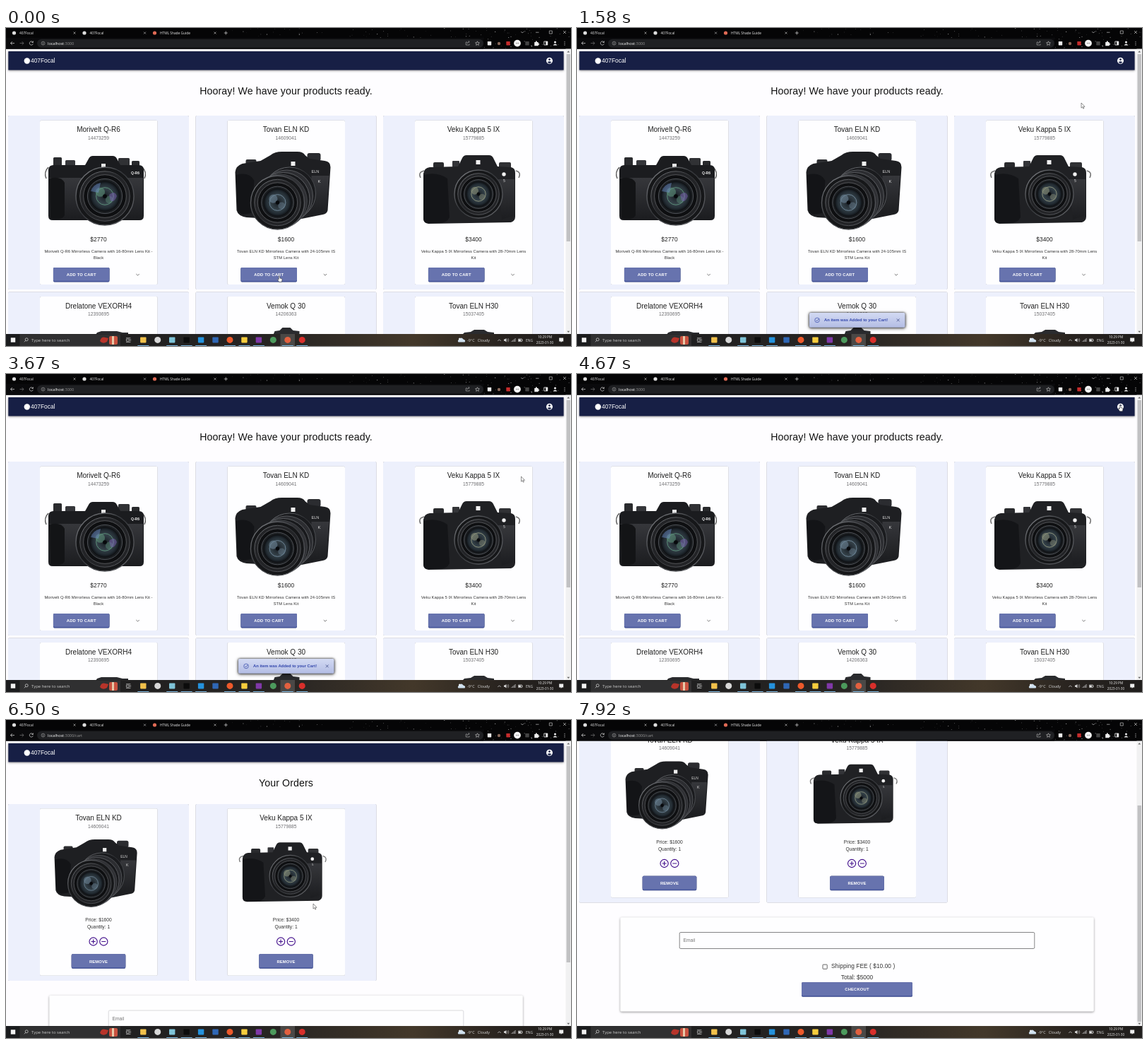
Recreate the animation shown at these times as an HTML page. Size 800 px wide and 450 px high, loop 8 s.

```html
<!DOCTYPE html>
<html lang="en">
<head>
<meta charset="utf-8">
<title>Camera shop</title>
<style>
html, body { margin: 0; width: 100%; height: 100%; overflow: hidden; background: #000; }
svg { display: block; width: 100vw; height: 100vh; }
text { font-family: "Liberation Sans", Arial, sans-serif; white-space: pre; }
.ui { font-family: "Open Sans", sans-serif; }
.low { filter: drop-shadow(0 .7px .5px rgba(0,0,0,.4)); }
.mid { filter: drop-shadow(0 1px 1.6px rgba(0,0,0,.42)); }
.high { filter: drop-shadow(0 1.5px 2.5px rgba(0,0,0,.55)); }
.dark { filter: drop-shadow(0 0 1.6px rgba(0,0,0,.75)) drop-shadow(0 1px 2.2px rgba(0,0,0,.6)); }
</style>
</head>
<body>
<svg id="stage" viewBox="0 0 800 450" preserveAspectRatio="none"></svg>
<script>
const COLS = [131, 396.5, 662];
const NAVY = '#171f45';

// Drawing helpers; text is placed by the middle of its capitals.
const attrs = o => Object.entries(o).map(([k, v]) => ` ${k}="${v}"`).join('');
const rect = (x, y, w, h, fill, o = {}) =>
  `<rect x="${x}" y="${y}" width="${w}" height="${h}" fill="${fill}"${attrs(o)}/>`;
const circle = (x, y, r, fill, o = {}) =>
  `<circle cx="${x}" cy="${y}" r="${r}" fill="${fill}"${attrs(o)}/>`;
const path = (d, fill, o = {}) => `<path d="${d}" fill="${fill}"${attrs(o)}/>`;
const line = (d, stroke, w = .7, o = {}) =>
  path(d, 'none', { stroke, 'stroke-width': w, ...o });
const text = (x, y, s, size, fill = '#212121', o = {}) =>
  `<text x="${x}" y="${y + size * .358}" font-size="${size}" fill="${fill}"${attrs(o)}>${s}</text>`;
const mid = (x, y, s, size, fill, o = {}) =>
  text(x, y, s, size, fill, { 'text-anchor': 'middle', ...o });
const ui = (x, y, s, size, fill = '#ddd', o = {}) => text(x, y, s, size, fill, { class: 'ui', ...o });
const group = (body, o = {}) => `<g${attrs(o)}>${body}</g>`;
const cross = (x, y, r, color, w = .6) =>
  line(`M${x - r} ${y - r}l${2 * r} ${2 * r}m0 ${-2 * r}l${-2 * r} ${2 * r}`, color, w);

function button(cx, y, w, label) {
  const x = cx - w / 2;
  return group(rect(x, y, w, 20.5, '#4a5a9f', { rx: 1.7 }) + rect(x, y, w, 18.7, '#6773ae', { rx: 1.7 }),
    { class: 'low' }) +
    mid(cx, y + 10.2, label, 5.83, '#fff', { 'font-weight': 700, 'letter-spacing': .165 });
}

// Cameras: x is measured from the column centre.
const ring = (x, y, r, fill, stroke, w = 1) => circle(x, y, r, fill, { stroke, 'stroke-width': w });
const lens = (x, y, r, tint) =>
  ring(x, y, r, '#161719', 'url(#rim)', 1.4) + ring(x, y, r * .86, '#232427', 'url(#rim)', 1) +
  ring(x, y, r * .74, '#0e0f11', '#77797d', .6) + ring(x, y, r * .6, '#1b1e21', '#55595e', .9) +
  circle(x, y, r * .53, 'url(#glass)') + ring(x, y, r * .3, 'none', tint, 1) +
  circle(x - r * .16, y - r * .14, r * .16, tint, { opacity: .6 }) +
  circle(x + r * .15, y + r * .12, r * .13, tint, { opacity: .45 }) + circle(x, y, r * .07, '#07090c');

const cameraA = () =>
  line('M-71 197q-7 7-3 16M62 197q7 7 3 16', '#555', 1.4) +
  rect(-64, 183, 12, 12, '#2a2b2e', { rx: 1.5 }) + rect(-47, 187, 14, 8, '#35363a', { rx: 1.5 }) +
  rect(28, 184, 16, 11, '#303134', { rx: 1.5 }) + rect(47, 188, 11, 8, '#28292c', { rx: 1.5 }) +
  path('M-71 200q1-6 7-6H-19l5-9q2-4 6-4H20q4 0 6 4l5 9H57q7 0 7 7V266q0 6-6 6H-65q-6 0-6-6z', '#1b1c1f') +
  path('M-70 212H63V265q0 5-5 5H-64q-6 0-6-6z', 'url(#body)') +
  path('M-70 213q17-4 22 6v46q-4 8-20 5z', '#131416') +
  rect(4, 192, 6, 6, '#e8e8e8') + text(46, 205, 'Q-R6', 5, '#eee', { 'font-weight': 700 }) +
  lens(9, 238, 41, '#5c8f79') +
  path('M-11 231q3-10 14-12l-3 14z', '#6c8cc4', { opacity: .5 }) +
  path('M15 236q8-7 11 2q-4 10-9 6z', '#7c63b5', { opacity: .5 });

const cameraB = () =>
  rect(-57, 186, 15, 8, '#2d2e31', { rx: 2 }) + rect(30, 177, 19, 11, '#2b2c30', { rx: 3 }) +
  path('M-72 204q1-9 10-12l26-4 14-8q6-5 16-5l22 0q8 0 11 5l6 5 22 3q8 1 8 9L59 258q-1 5-7 6l-40 8-68-4q-12-2-14-10z', '#1e1f22') +
  path('M-71 208q19-5 26 8l-4 46-12 2q-8-2-8-10z', '#131417') +
  path('M36 209H61L57 259l-22 5z', 'url(#body)') +
  rect(7, 189, 6, 6, '#f0f0f0') + text(36, 203, 'ELN', 5.6, '#ddd') + text(45, 217, 'K', 6, '#ddd') +
  ring(5, 234, 37, '#1a1b1e', 'url(#rim)') + ring(1, 238, 37, '#2c2d31', '#55575b') +
  ring(-4, 242, 37.5, '#18191c', '#6a6c70', .8) + ring(-8, 245, 38, '#303135', '#4a4c50', .8) +
  lens(-12, 247, 38, '#6d8496');

const cameraC = () =>
  line('M-70 202q-9 2-5 10M60 202q8 2 4 10', '#777', 1.5) +
  rect(-57, 190, 15, 8, '#292a2d', { rx: 2 }) + rect(-30, 188, 10, 9, '#333438', { rx: 1 }) +
  rect(36, 190, 17, 9, '#303134', { rx: 2 }) +
  path('M-71 206q1-8 9-9l40-1 6-12q2-4 6-4H22q4 0 6 4l6 12 19 1q6 1 6 8V267q0 6-6 8L-64 277q-6-1-7-7z', '#202124') +
  path('M-71 208q20-5 34 5l3 55q-4 8-14 8H-66q-5 0-5-7z', '#141518') +
  path('M35 214H58V265l-18 6z', 'url(#body)') +
  rect(3.5, 187, 6, 6, '#f2f2f2') + circle(43, 207, 2.7, '#f2f2f2') + text(42, 216.5, '5', 5, '#ddd') +
  lens(7, 235, 34, '#8b917a');

const PRODUCTS = [
  { name: 'Morivelt Q-R6', code: '14473259', price: 2770, art: cameraA(),
    info: ['Morivelt Q-R6 Mirrorless Camera with 16-80mm Lens Kit -', 'Black'] },
  { name: 'Tovan ELN KD', code: '14609041', price: 1600, art: cameraB(),
    info: ['Tovan ELN KD Mirrorless Camera with 24-105mm IS', 'STM Lens Kit'] },
  { name: 'Veku Kappa 5 IX', code: '15779885', price: 3400, art: cameraC(),
    info: ['Veku Kappa 5 IX Mirrorless Camera with 28-70mm Lens', 'Kit'] }
];
const NEXT_ROW = [
  { name: 'Drelatone VEXORH4', code: '12393695', top: 'M-4 434l2-3 6-2h22l8 2 8 0v3z' },
  { name: 'Vemok Q 30', code: '14206363', top: 'M-18 434l2-5 7-1 4-4h11l4 4 9 1v5z' },
  { name: 'Tovan ELN H30', code: '15037405', top: 'M-16 434l3-3 9-1 5-3h14l5 3 9 1v3z' }
];

function panel(cx, y, h, cardY, cardH) {
  return rect(cx - 128, y, 256, h, '#edf0fc', { rx: 1.7, class: 'low' }) +
    rect(cx - 83, cardY, 166.5, cardH, '#fefeff', { rx: 1.7, class: 'low' });
}
const heading = (cx, y, p) => mid(cx, y, p.name, 10) +
  mid(cx, y + 11.7, p.code, 6.67, '#6d6d70', { 'letter-spacing': .06 });

function header() {
  return rect(3.3, 33, 786.3, 26.5, NAVY, { class: 'mid' }) +
    circle(29.8, 46.5, 4.2, '#fff') + text(35, 46.3, '407Focal', 8.4, '#fff') +
    circle(769.5, 46.3, 4.5, '#fff') + circle(769.5, 44.6, 1.4, NAVY) +
    path('M766.7 48.6q2.8-2.6 5.6 0q-2.8 2.6-5.6 0z', NAVY);
}

const title = s => mid(396.5, 89, s, 14.17, '#111', { 'letter-spacing': .1 });

function productCard(p, i) {
  const cx = COLS[i];
  return panel(cx, 124, 246, 130.7, 232.3) + heading(cx, 143.7, p) +
    group(p.art, { transform: `translate(${cx} 0)` }) +
    mid(cx, 298.7, '$' + p.price, 8.33, '#212121', { 'letter-spacing': .06 }) +
    p.info.map((s, k) => mid(cx, 316.3 + 8.3 * k, s, 5.83, '#333', { 'letter-spacing': .06 })).join('') +
    button(cx - 24.3, 339, 79.5, 'ADD TO CART') +
    line(`M${cx + 53.3} 348l2.2 2.2 2.2-2.2`, '#555', .8);
}
const nextCard = (p, i) => panel(COLS[i], 373.5, 246, 380, 232) + heading(COLS[i], 393.2, p) +
  path(p.top, '#2a2b2e', { transform: `translate(${COLS[i]} 0)` });

const productsPage = () => header() + title('Hooray! We have your products ready.') +
  PRODUCTS.map(productCard).join('') + NEXT_ROW.map(nextCard).join('');

function orderCard(p, i) {
  const cx = COLS[i], purple = { stroke: '#43108c', 'stroke-width': 1.15 };
  return panel(cx, 119, 250, 125.3, 236.5) + heading(cx, 138.7, p) +
    group(p.art, { transform: `translate(${cx} 17.2) scale(.867)` }) +
    mid(cx, 282.7, 'Price: $' + p.price, 6.67, '#333') + mid(cx, 292.7, 'Quantity: 1', 6.67, '#333') +
    circle(cx - 7.4, 313.5, 5.6, 'none', purple) + circle(cx + 7.3, 313.5, 5.6, 'none', purple) +
    line(`M${cx - 10.4} 313.5h6m-3-3v6M${cx + 4.3} 313.5h6`, '#43108c', 1.15) +
    button(cx, 331.3, 76.5, 'REMOVE');
}
const cartPage = () => header() + title('Your Orders') +
  PRODUCTS.slice(1).map(orderCard).join('') +
  rect(61.3, 389.7, 670.5, 133.3, '#fefeff', { rx: 1.7, class: 'mid' }) +
  rect(145.2, 411, 502.6, 23, 'none', { id: 'field', rx: 1.7, 'stroke-width': .6 }) +
  text(150.5, 422.2, 'Email', 6.67, '#777') +
  rect(348, 456.6, 6.2, 6.2, 'none', { rx: .6, stroke: '#555', 'stroke-width': .9 }) +
  text(360, 458.9, 'Shipping FEE ( $10.00 )', 8.33, '#333', { 'letter-spacing': .06 }) +
  mid(396.5, 475, 'Total: $5000', 8.33, '#333') + button(396.5, 481.7, 157, 'CHECKOUT');

function stars() {
  let seed = 7, out = '';
  const rnd = () => (seed = seed * 16807 % 2147483647) / 2147483647;
  for (let i = 0; i < 150; i++)
    out += circle(320 + 480 * rnd(), 29 * rnd(), .2 + .4 * rnd(), '#fff', { opacity: .25 + .6 * rnd() });
  return out;
}

function browser() {
  const tab = (x, color, s) => circle(x, 7, 2.6, color) + ui(x + 7.4, 7, s, 4.85, '#eee') +
    cross(x + 85.5, 7, 1.5, '#ccc');
  const square = (x, color) => rect(x - 2.7, 19, 5.4, 5.4, color, { rx: .6 });
  return rect(0, 0, 800, 29.5, '#050506') + stars() +
    rect(0, 14, 676, 15.5, '#0a0a0c') + rect(44, 15.7, 632, 12, '#1f2023', { rx: 6 }) +
    tab(11.5, '#ddd', '407Focal') + tab(111, '#ddd', '407Focal') + tab(210.5, '#e06a55', 'HTML Shade Guide') +
    line('M308.8 7h5m-2.5-2.5v5', '#ddd') +
    line('M729.2 5l2 2 2-2M750 6.2h4.5M769.3 4h4v4h-4z', '#ddd', .6) + cross(791, 6, 2, '#ddd') +
    line('M12 21.5H6.5m2.4-2.4l-2.4 2.4 2.4 2.4', '#ddd') +
    line('M19.5 21.5H25m-2.4-2.4l2.4 2.4-2.4 2.4', '#777') +
    line('M38 20a2.6 2.6 0 1 0 .3 2.4M38.4 18.5v2h-2', '#ddd') +
    circle(52.5, 21.6, 2.4, 'none', { stroke: '#ccc', 'stroke-width': .5 }) + line('M52.5 21.2v1.7m0-2.8v.5', '#ccc', .6) +
    ui(59, 21.6, 'localhost<tspan fill="#999">:3000<tspan id="url"></tspan></tspan>', 5.5, '#fff') +
    line('M653 20h-1.8v4h5v-1.4m-3.2-.3q0-2.6 3-2.8m-1.2-1.3l1.4 1.3-1.4 1.3', '#bbb', .6) +
    line('M667.5 18.8l.9 1.9 2 .2-1.5 1.4.4 2-1.8-1-1.8 1 .4-2-1.5-1.4 2-.2z', '#ddd', .6) +
    square(684.5, '#eee') + circle(698, 22, 2.2, '#8a6a5c') + square(711, '#c62c2c') +
    circle(724, 21.6, 4.9, '#f4f4f4') + mid(724, 21.8, '•••', 4, '#555') + square(738, '#444') +
    path('M748.2 20h1.7q-.2-1.8 1-1.8t1 1.8h1.8v1.7q1.6-.1 1.6 1t-1.6 1v1.6h-5.5z', '#eee') +
    line('M761.8 19h5v5h-5z', '#eee', .8) + rect(764.3, 19, 2.6, 5, '#eee') +
    circle(777.5, 20, 1.5, '#eee') + path('M774.5 24.4q3-4 6 0z', '#eee') +
    [19.3, 21.6, 23.9].map(y => circle(791, y, .55, '#ddd')).join('');
}

function taskbar() {
  const icons = ['#f2c14b', '#d8d8d8', '#7fc4d8', '#0c0c0c', '#2492dd', '#2f67b5',
    '#ee5a2b', '#f6cd3d', '#8038a8', '#4c9a5c', '#e2603f', '#d92f2b'];
  const round = [1, 6, 9, 10, 11], closed = [1, 5, 9];
  return rect(0, 433, 800, 17, 'url(#bar)') + rect(19.5, 433.5, 142.5, 16.5, '#303031') +
    rect(6.8, 438.3, 6.4, 6.4, '#f2f2f2') +
    circle(29.2, 440.8, 2, 'none', { stroke: '#ddd', 'stroke-width': .7 }) + line('M27.8 442.3l-2 2', '#ddd') +
    ui(36, 441.8, 'Type here to search', 5.95, '#c8c8c8') +
    path('M133 443q2-7 8-5l4 1-2 5q-6 4-10-1z', '#b8342a') + rect(146, 436, 12, 12, '#c9523f', { rx: 2 }) +
    rect(150, 436, 3, 12, '#e7c9a8') +
    line('M170 438.7h6.4m-6.4 5.8h6.4M170.4 440.2h4v2.8h-4zM176.2 440v3.2', '#ccc', .7) +
    rect(388.5, 433, 20.5, 17, '#4a4846') +
    icons.map((color, i) => {
      const x = 194.3 + 20.45 * i;
      return (round.includes(i) ? circle(x, 441.4, 4.5, color) : rect(x - 4.2, 437.4, 8.4, 8, color, { rx: .8 })) +
        (closed.includes(i) ? '' : rect(x - 8, 449, 16, 1, '#79b3dc'));
    }).join('') +
    path('M640.5 444.5q-2-3 2-4 2-4 5 0 4 1 2 4z', '#cfe0ee') + circle(642.5, 440, 1.6, '#e9eef4') +
    ui(653, 441.8, '-9°C   Cloudy', 5.4) + line('M696.3 443l2.2-2.2 2.2 2.2', '#ddd') +
    path('M705 440.6h1.4l2-1.7v5.6l-2-1.7H705z', '#ddd') + line('M709.6 440q1.3 1.6 0 3.4m1.3-4.4q2 2.7 0 5.4', '#ddd', .5) +
    line('M716 444v-1.2m1.7 1.2v-2.4m1.7 2.4v-3.7m1.7 3.7v-5', '#ccc', .8) +
    line('M725.5 440h5v3.6h-5zm5.6 1v1.5', '#ddd', .7) + rect(726, 440.5, 3, 2.6, '#ddd') +
    ui(736, 441.8, 'ENG', 5) + ui(763, 437.6, '10:29 PM', 4.7, '#eee', { 'text-anchor': 'middle' }) +
    ui(763, 445.6, '2023-01-30', 4.7, '#eee', { 'text-anchor': 'middle' }) +
    path('M783.2 438.5h6v5h-2l-1.5 1.6v-1.6h-2.5z', '#eee');
}

const snackbar = () => rect(329, 403, 135.5, 20.8, 'url(#snack)', { rx: 1.7, class: 'dark' }) +
  circle(340, 413.4, 3.3, 'none', { stroke: '#3348a8', 'stroke-width': .7 }) +
  line('M338.4 413.4l1.3 1.3 3-3.2', '#3348a8', .8) +
  text(350, 413.4, 'An item was Added to your Cart!', 5.83, '#3448ac', { 'font-weight': 700 }) +
  cross(454.7, 413.4, 1.9, '#3d4a86', .8);

const menu = () => rect(739.5, 36.7, 40.3, 36.3, '#fff', { rx: 1.7, class: 'high' }) +
  group(path('M743 60q2-7 11-6 10 1 10 7 0 8-10 8-12 0-11-9z', '#f7a3a0', { opacity: .75 }), { id: 'ripple' }) +
  mid(759.6, 46.9, 'Products', 6.67, '#2b2bdc') + mid(758, 62, 'My Cart', 6.67, '#ee2f2f');

const gradient = (id, stops, o = {}, kind = 'linear') => `<${kind}Gradient id="${id}"${attrs(o)}>` +
  stops.map(([at, color]) => `<stop offset="${at}" stop-color="${color}"/>`).join('') + `</${kind}Gradient>`;
const DOWN = { x2: 0, y2: 1 };

const stage = document.getElementById('stage');
stage.innerHTML = '<defs><clipPath id="view"><rect y="29.5" width="800" height="403.5"/></clipPath>' +
  gradient('glass', [[0, '#171c22'], [.5, '#35424a'], [.8, '#222b32'], [1, '#0b0c0f']], {}, 'radial') +
  gradient('rim', [[0, '#85878b'], [.45, '#34363a'], [1, '#66686c']], { x2: 1, y2: 1 }) +
  gradient('body', [[0, '#36373b'], [1, '#1c1d20']], DOWN) +
  gradient('bar', [[0, '#1b1c1e'], [.5, '#282523'], [.72, '#43382a'], [.88, '#28231f'], [1, '#1f1d1c']]) +
  gradient('snack', [[0, '#d3daf3'], [1, '#b3bde4']], DOWN) + '</defs>' +
  group(rect(0, 29, 800, 404, '#fefdff') +
    group(productsPage(), { id: 'products' }) + group(cartPage(), { id: 'cart' }) +
    group(rect(792.5, 29, 7.5, 404, '#f1f1f2') +
      path('M794.4 34.5l1.9-2.2 1.9 2.2z', '#666') + path('M794.4 428.8l1.9 2.2 1.9-2.2z', '#666') +
      rect(793.6, 37, 5.4, 265, '#c1c1c3', { id: 'thumb' }), { id: 'scrollbar' }) +
    group(snackbar(), { id: 'snackbar' }) + group(menu(), { id: 'menu' }) +
    group(rect(0, 425, 46.5, 8, '#202124', { rx: 1 }) + ui(2, 429, '<tspan id="link"></tspan>', 4.8, '#e4e4e6'), { id: 'status' }),
    { 'clip-path': 'url(#view)' }) +
  browser() + taskbar() +
  path('M0 0v7.2l1.7-1.5 1.1 2.5 1.1-.5-1.1-2.4h2.2z', '#fff', { id: 'arrow', stroke: '#222', 'stroke-width': .5 }) +
  path('M-.8 .6q.8-1.2 1.6 0v3l2.6.7q.8.3.6 1.3l-.6 3.2h-3.8l-2.2-3.2q.4-1 1.8 0z', '#fff',
    { id: 'hand', stroke: '#222', 'stroke-width': .5 });

const el = id => document.getElementById(id);
const show = (id, on) => el(id).setAttribute('opacity', +on);

// Pointer path: tick, x, y (one tick is a tenth of a second).
const POINTER = [[0, 387, 350.5], [11, 387, 350.5], [13, 450, 305], [14, 560, 215], [15, 660, 145], [16, 714, 106],
  [17, 764, 46], [19, 769, 43], [24, 769, 43], [26, 715, 190], [28, 655, 330], [29, 645, 347], [34, 645, 347],
  [36, 695, 230], [37, 729.5, 145], [39, 748, 95], [42, 756, 62], [44, 769, 44], [48, 769, 44], [50, 760, 50],
  [51, 754.5, 64.5], [63, 754.5, 64.5], [64, 590, 165], [65, 435, 260], [67, 470, 285], [71, 528, 318], [76, 528, 318]];
const OVER_LINKS = [[0, 11], [17, 24], [29, 34], [43, 58], [59, 63]];
const SCROLL = [[72, 0], [73, 25], [74, 66], [75, 95], [76, 107], [77, 110.5]];

function sample(keys, t, col = 1) {
  const next = keys.findIndex(k => k[0] >= t);
  if (next < 0) return keys[keys.length - 1][col];
  if (next === 0) return keys[0][col];
  const a = keys[next - 1], b = keys[next];
  return a[col] + (b[col] - a[col]) * (t - a[0]) / (b[0] - a[0]);
}

function draw(t) {
  const inCart = t >= 59, scroll = sample(SCROLL, t);
  show('products', !inCart);
  show('cart', inCart);
  el('cart').setAttribute('transform', `translate(0 ${-scroll})`);
  el('field').setAttribute('stroke', t >= 76 ? '#333' : '#c2c2c4');
  el('url').textContent = t >= 56 ? '/cart' : '';

  show('menu', sample([[47, 0], [49, 1], [58, 1], [60, 0]], t));
  show('ripple', t >= 56);
  show('scrollbar', t < 48 || t >= 60);
  el('thumb').setAttribute('y', 37 + scroll * 390 / 513.5);
  el('thumb').setAttribute('height', inCart ? 306 : 265);

  const snack = sample([[4, 0], [7, 1], [45, 1], [47, 0]], t), size = .75 + .25 * snack;
  show('snackbar', snack);
  el('snackbar').setAttribute('transform',
    `translate(396.7 413.4) scale(${size}) translate(-396.7 -413.4)`);

  show('status', t >= 50 && t < 64);
  el('link').textContent = 'localhost:3000/' + (t >= 51 ? 'cart' : '');

  const hand = OVER_LINKS.some(([a, b]) => t >= a && t <= b), visible = t < 76;
  show('hand', hand && visible);
  show('arrow', !hand && visible);
  const place = `translate(${sample(POINTER, t)} ${sample(POINTER, t, 2)})`;
  el('hand').setAttribute('transform', place);
  el('arrow').setAttribute('transform', place);
}

// Ten ticks a second shown on a twelve-per-second clock.
let last = -1;
function loop() {
  const n = Math.floor((performance.now() % 8000 + 4) * 12 / 1000) % 96;
  const tick = 5 * Math.floor(n / 6) + [0, 1, 2, 2, 3, 4][n % 6];
  if (tick !== last) draw(last = tick);
  requestAnimationFrame(loop);
}
draw(0);
loop();
</script>
</body>
</html>
```
